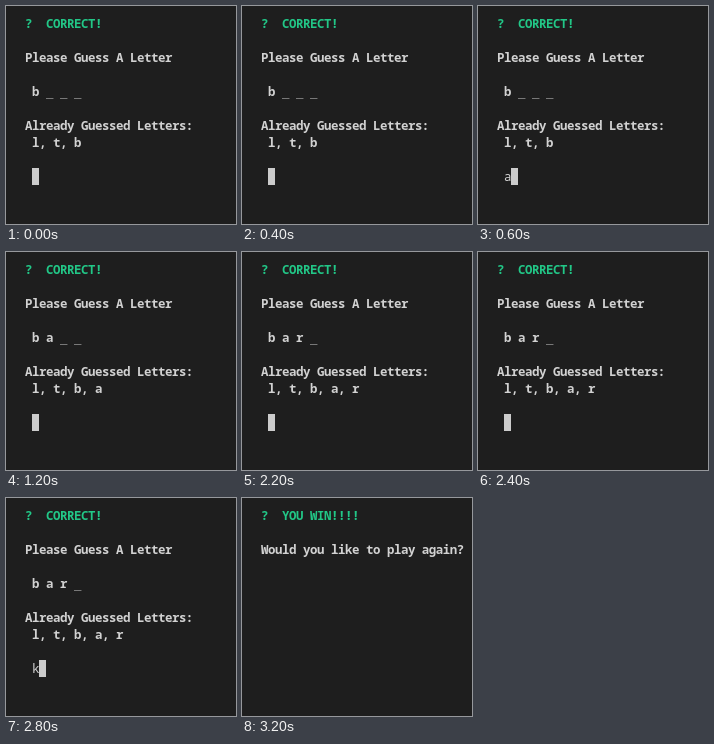
An HTML page for the animation above (3400 ms loop, 230 by 218 pixels).

```html
<!DOCTYPE html>
<html lang="en">
<head>
<meta charset="utf-8">
<title>Letter guessing game</title>
<style>
  html, body { margin: 0; width: 100%; height: 100%; overflow: hidden; background: #1e1e1e; }
  svg { display: block; }
  text {
    font: 600 12.4px "Noto Sans Mono", "DejaVu Sans Mono", monospace;
    letter-spacing: calc(7px - 0.6em);
    fill: #d2d2d2;
    white-space: pre;
  }
  .status { fill: #22c787; }
  .typed { font-weight: 400; }
  .blank { font-family: "DejaVu Sans Mono", monospace; font-weight: 400; }
</style>
</head>
<body>
<svg id="stage" width="230" height="218" viewBox="0 0 230 218"></svg>
<script>
const LOOP = 3400;
const LEFT = 19, TOP = 9, CELL = 7, LINE = 17, BASELINE = 13;
const PROMPT_ROW = 9;

const stage = document.getElementById("stage");

function add(name, attributes) {
  const node = document.createElementNS("http://www.w3.org/2000/svg", name);
  for (const [key, value] of Object.entries(attributes)) node.setAttribute(key, value);
  return stage.appendChild(node);
}

function addLine(row, column = 0, className = "") {
  return add("text", {
    x: LEFT + column * CELL,
    y: TOP + row * LINE + BASELINE,
    class: className
  });
}

add("rect", { width: 230, height: 218, fill: "#1e1e1e" });
const mark = addLine(0, 0, "status");
const status = addLine(0, 3, "status");
const question = addLine(2);
const word = addLine(4, 1);
const blanks = addLine(4, 1, "blank");
const heading = addLine(6);
const guesses = addLine(7, 1);
const input = addLine(PROMPT_ROW, 1, "typed");
const cursor = add("rect", {
  y: TOP + PROMPT_ROW * LINE, width: CELL, height: LINE, fill: "#cccccc"
});

// Each guess is typed first and submitted a moment later.
const steps = [
  { at: 0, word: "b _ _ _", guesses: "l, t, b", typed: "" },
  { at: 600, typed: "a" },
  { at: 1200, word: "b a _ _", guesses: "l, t, b, a", typed: "" },
  { at: 1800, typed: "r" },
  { at: 2200, word: "b a r _", guesses: "l, t, b, a, r", typed: "" },
  { at: 2800, typed: "k" },
  { at: 3200, word: "", guesses: "", typed: "", won: true }
];

function stateAt(time) {
  return Object.assign({}, ...steps.filter(step => step.at <= time));
}

function render(time) {
  const state = stateAt(time);
  mark.textContent = "?";
  status.textContent = state.won ? "YOU WIN!!!!" : "CORRECT!";
  question.textContent = state.won ? "Would you like to play again?" : "Please Guess A Letter";
  word.textContent = state.word.replace(/_/g, " ");
  blanks.textContent = state.word.replace(/[a-z]/g, " ");
  heading.textContent = state.won ? "" : "Already Guessed Letters:";
  guesses.textContent = state.guesses;
  input.textContent = state.typed;
  cursor.setAttribute("x", LEFT + (1 + state.typed.length) * CELL);
  cursor.setAttribute("visibility", state.won ? "hidden" : "visible");
}

const start = performance.now();
function tick() {
  render((performance.now() - start) % LOOP);
  requestAnimationFrame(tick);
}
tick();
</script>
</body>
</html>
```
